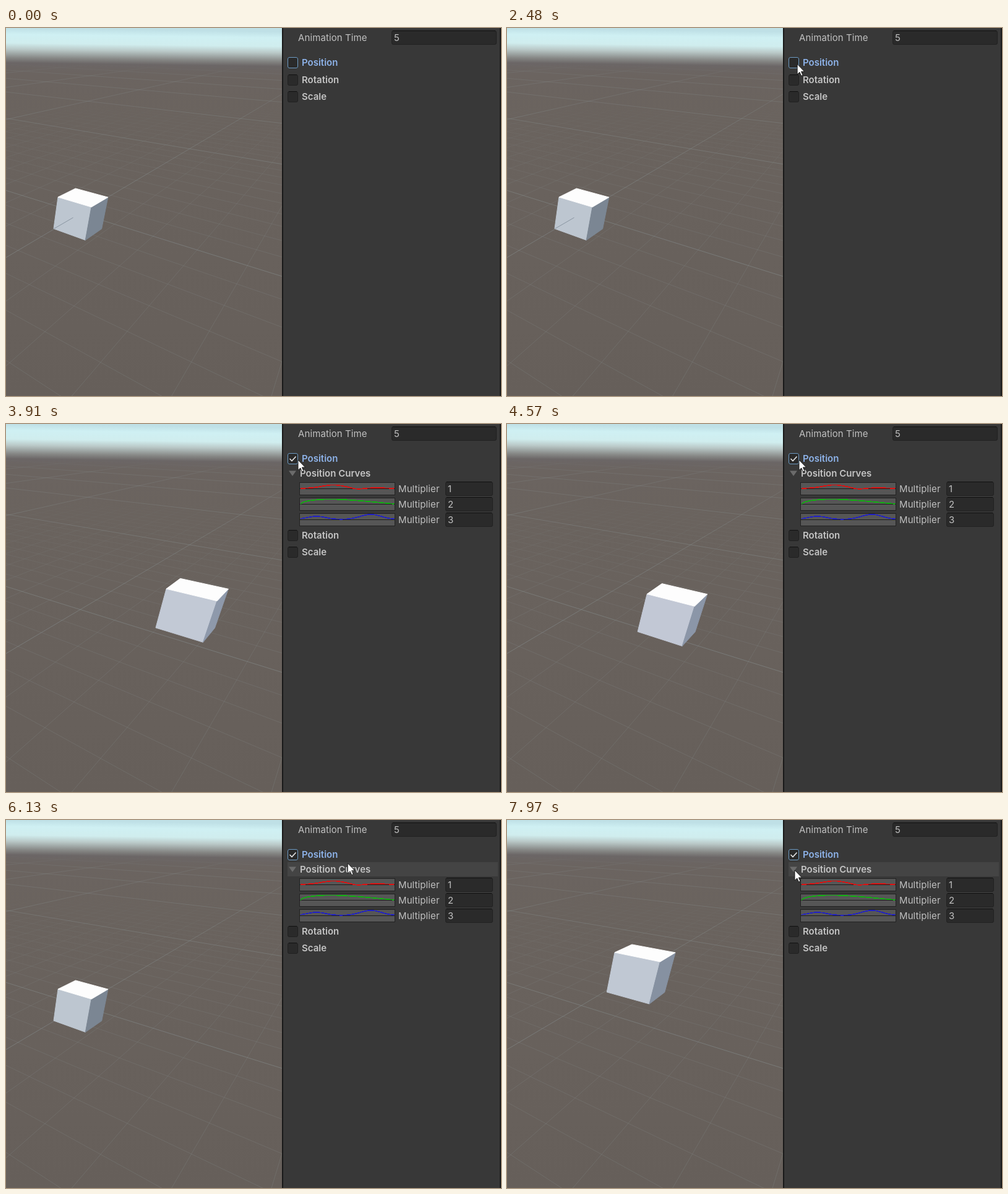
These frames come from a looping animation (800x594 px, 7.99 s). An HTML page with a canvas:

```html
<!DOCTYPE html>
<html>
<head>
<meta charset="utf-8">
<style>
  html, body { margin: 0; width: 100%; height: 100%; overflow: hidden; background: #383838; }
  canvas, svg { position: absolute; left: 0; top: 0; display: block; }
  text { font: 15px Inter, sans-serif; fill: #c0c0c0; letter-spacing: .1px; }
  .bold { font-weight: 600; fill: #c4c4c4; letter-spacing: 0; }
  .focus { fill: #8db2e8; }
  .box { fill: #2a2a2a; stroke: #212121; }
  .curve { fill: none; stroke-width: 1.7; shape-rendering: crispEdges; }
</style>
</head>
<body>
<canvas id="scene" width="446" height="594"></canvas>
<svg id="ui" width="800" height="594" viewBox="0 0 800 594"></svg>
<script>
const LOOP = 7990, OPEN_AT = 2700, CURSOR_AT = 290;
const CYCLE = 6500, CYCLE_OFFSET = 370;
const $ = id => document.getElementById(id);

// World axes: a (right, away), b (right, near), u (up).
function project(a, b, u) {
  const z = 10.87 + .6314 * a - .6408 * b - .4357 * u;
  return [
    -95 + 607 * (3.85 + .7126 * a + .7021 * b) / z,
    316 + 607 * (-.2957 - .3058 * a + .3104 * b - .9001 * u) / z
  ];
}

// Ground point from the origin and the vanishing points (606, 12) and (-805, 12).
function ground(a, b) {
  const p = a / 17.5, q = b / 17.7, w = 1 + p - q;
  return { x: (120 + 606 * p + 805 * q) / w, y: (299.5 + 12 * (p - q)) / w, w };
}

// ---- Static ground, grid and sky ----
const ctx = $('scene').getContext('2d');

function fillGradient(dx, height, stops) {
  const g = ctx.createLinearGradient(0, 0, dx, height);
  stops.forEach(([y, color]) => g.addColorStop(y / height, color));
  ctx.fillStyle = g;
  ctx.fillRect(0, 0, 446, 594);
}

function gridSegment(p, q, alpha, fade) {
  const k = 1 - p.w / fade;
  if (Math.min(p.w, q.w) < .1 || k <= 0) return;
  ctx.globalAlpha = alpha * k;
  ctx.beginPath();
  ctx.moveTo(p.x, p.y);
  ctx.lineTo(q.x, q.y);
  ctx.stroke();
}

function drawGrid(step, range, alpha, fade) {
  for (let i = -range; i <= range; i += step)
    for (let j = -range; j < range; j++) {
      gridSegment(ground(i, j), ground(i, j + 1), alpha, fade);
      gridSegment(ground(j, i), ground(j + 1, i), alpha, fade);
    }
}

fillGradient(0, 594, [[0, '#6c6562'], [150, '#6a635e'], [594, '#665f5a']]);
ctx.strokeStyle = '#8f9a9b';
drawGrid(1, 40, .28, 2.6);
drawGrid(10, 160, .32, 11);
ctx.globalAlpha = 1;
fillGradient(-1, 75, [
  [0, '#bfe0e6'], [10, '#cff0f3'], [24, '#d0edee'], [34, '#bac9c8'], [48, '#858684'],
  [56, '#6b6666'], [75, 'rgba(107,101,98,0)']
]);

// ---- Panel, cube and cursor ----
const label = (x, y, s, cls = '') => `<text x="${x}" y="${y}" class="${cls}">${s}</text>`;
const box = (x, y, w, h) =>
  `<rect x="${x + .5}" y="${y + .5}" width="${w - 1}" height="${h - 1}" rx="2.5" class="box"/>` +
  `<path d="M${x + 2} ${y + .5}h${w - 4}" stroke="#101010"/>`;
const field = (x, y, w, value) => box(x, y, w, 23) + label(x + 4, y + 17, value);
const toggle = (y, s) => box(455, y, 17, 18) + label(478, y + 14, s, 'bold');

function curveRow(index, color, height) {
  let d = '';
  for (let i = 0; i <= 50; i++)
    d += `${i ? 'L' : 'M'}${476 + 3.03 * i} ${(10 - height(i / 50)).toFixed(2)}`;
  return `<g transform="translate(0 ${94 + 25 * index})">
    <rect x="474.5" y=".5" width="154" height="20" fill="#565656" stroke="#222"/>
    <path d="M475 10.5H628" stroke="#1c1c1c"/>
    <path d="${d}" class="curve" stroke="${color}"/>
    ${label(634, 16, 'Multiplier')}${field(710, -1, 77, index + 1)}</g>`;
}

const bump = (p, center, width) => Math.exp(-(((p - center) / width) ** 2));
const redCurve = p => 5.5 * bump(p, .35, .18) - 1.5 * bump(p, .6, .08) + bump(p, .82, .12);
const greenCurve = p => 7.5 * Math.sin(Math.PI * p ** .6);
const blueCurve = p => 5 * bump(p, .17, .14) + 8 * bump(p, .75, .16);

$('ui').innerHTML = `
  <g transform="translate(0 -.4)">
    <polygon id="front"/><polygon id="side"/><polygon id="top"/>
  </g>
  <path id="inner" d="M77.500 324L108.500 306" stroke="#6d7b88" stroke-opacity=".65"/>
  <rect x="446" width="354" height="594" fill="#191919"/>
  <rect x="448" width="350" height="594" fill="#383838"/>
  ${label(472, 21, 'Animation Time')}${field(623, 4, 170, '5')}
  ${box(455, 47, 17, 18)}
  <rect x="455.5" y="47.5" width="16" height="17" rx="2.5" fill="none" stroke="#6f9cc4"/>
  ${label(478, 61, 'Position', 'bold focus')}
  <g id="open">
    <path d="M458.500 56L462 59.500L468.500 52.500" fill="none" stroke="#e6e6e6" stroke-width="1.6"/>
    <rect id="hover" x="455" y="68" width="340" height="23" fill="#444"/>
    <path d="M457 75.500H469L463 84Z" fill="#6b6b6b"/>
    ${label(475, 85, 'Position Curves', 'bold')}
    ${curveRow(0, '#e01010', redCurve)}
    ${curveRow(1, '#10b010', greenCurve)}
    ${curveRow(2, '#2020c8', blueCurve)}
  </g>
  <g id="rows">${toggle(75, 'Rotation')}${toggle(102, 'Scale')}</g>
  <path id="cursor" d="M0 0V16.500L3.800 13L6.500 19L9 17.900L6.400 12H11.500Z"
    fill="#fff" stroke="#111" stroke-width=".9"/>`;

// ---- Motion ----
// Cubic interpolation of [position, value] keys without overshoot.
function sample(keys, t) {
  const last = keys.length - 1;
  if (t <= keys[0][0]) return keys[0][1];
  if (t >= keys[last][0]) return keys[last][1];
  const slope = j => (keys[j + 1][1] - keys[j][1]) / (keys[j + 1][0] - keys[j][0]);
  const tangent = j => {
    if (j === 0) return slope(0);
    if (j === last) return slope(last - 1);
    const l = slope(j - 1), r = slope(j);
    return l * r > 0 ? 2 * l * r / (l + r) : 0;
  };
  const i = keys.findIndex(k => k[0] > t) - 1;
  const [t0, v0] = keys[i], [t1, v1] = keys[i + 1];
  const span = t1 - t0, s = (t - t0) / span, r = 1 - s;
  return r * r * (1 + 2 * s) * v0 + s * s * (3 - 2 * s) * v1 +
    span * s * r * (r * tangent(i) - s * tangent(i + 1));
}

// Offset along each axis over one cycle.
const cubeAxes = [
  [[0, 0], [.1, -.05], [.3, -.43], [.55, .1], [.82, -.12], [1, 0]],
  [[0, 0], [.094, .87], [.283, 1.5], [.545, 2.22], [.65, 2.65], [.885, 1.4], [1, 0]],
  [[0, 0], [.094, .5], [.3, 1.48], [.545, 1.065], [.885, .372], [1, 0]]
];

function cubePosition(t) {
  const phase = (t + CYCLE_OFFSET) / CYCLE % 1;
  return cubeAxes.map(keys => t < OPEN_AT ? 0 : sample(keys, phase));
}

const cursorStops = [
  [290, 556, 566], [580, 333, 175], [740, 363, 98], [1060, 363, 98], [1190, 391, 92], [1800, 434, 64],
  [2670, 472, 58], [5800, 472, 58], [6250, 569, 75], [6740, 473, 92], [7970, 465, 81]
];
const cursorAxes = [1, 2].map(n => cursorStops.map(stop => [stop[0], stop[n]]));

function drawCube([a, b, u]) {
  const face = (id, corners, rgb) => {
    const points = corners.map(([i, j, k]) => project(a + i / 2, b + j / 2, u + k / 2));
    const color = `rgb(${rgb.map(Math.round)})`;
    $(id).setAttribute('points', points.join(' '));
    $(id).setAttribute('fill', color);
    $(id).setAttribute('stroke', color);
  };
  face('front', [[-1, -1, 1], [-1, 1, 1], [-1, 1, -1], [-1, -1, -1]], [189 + 2 * b, 198 + b, 208 + 2 * b]);
  face('side', [[-1, 1, 1], [1, 1, 1], [1, 1, -1], [-1, 1, -1]], [123 + 7 * b, 134 + 7 * b, 147 + 9 * b]);
  face('top', [[-1, -1, 1], [-1, 1, 1], [1, 1, 1], [1, -1, 1]], [253, 253, 253]);
}

function show(id, on) { $(id).style.display = on ? '' : 'none'; }

function draw(now) {
  const t = now % LOOP, open = t >= OPEN_AT;
  const [x, y] = cursorAxes.map(keys => sample(keys, t));
  drawCube(cubePosition(t));
  show('inner', !open);
  show('open', open);
  show('hover', x > 455 && y > 68 && y < 91);
  show('cursor', t >= CURSOR_AT);
  $('rows').setAttribute('transform', `translate(0 ${open ? 96 : 0})`);
  $('cursor').setAttribute('transform', `translate(${x} ${y})`);
  requestAnimationFrame(draw);
}
requestAnimationFrame(draw);
</script>
</body>
</html>
```
